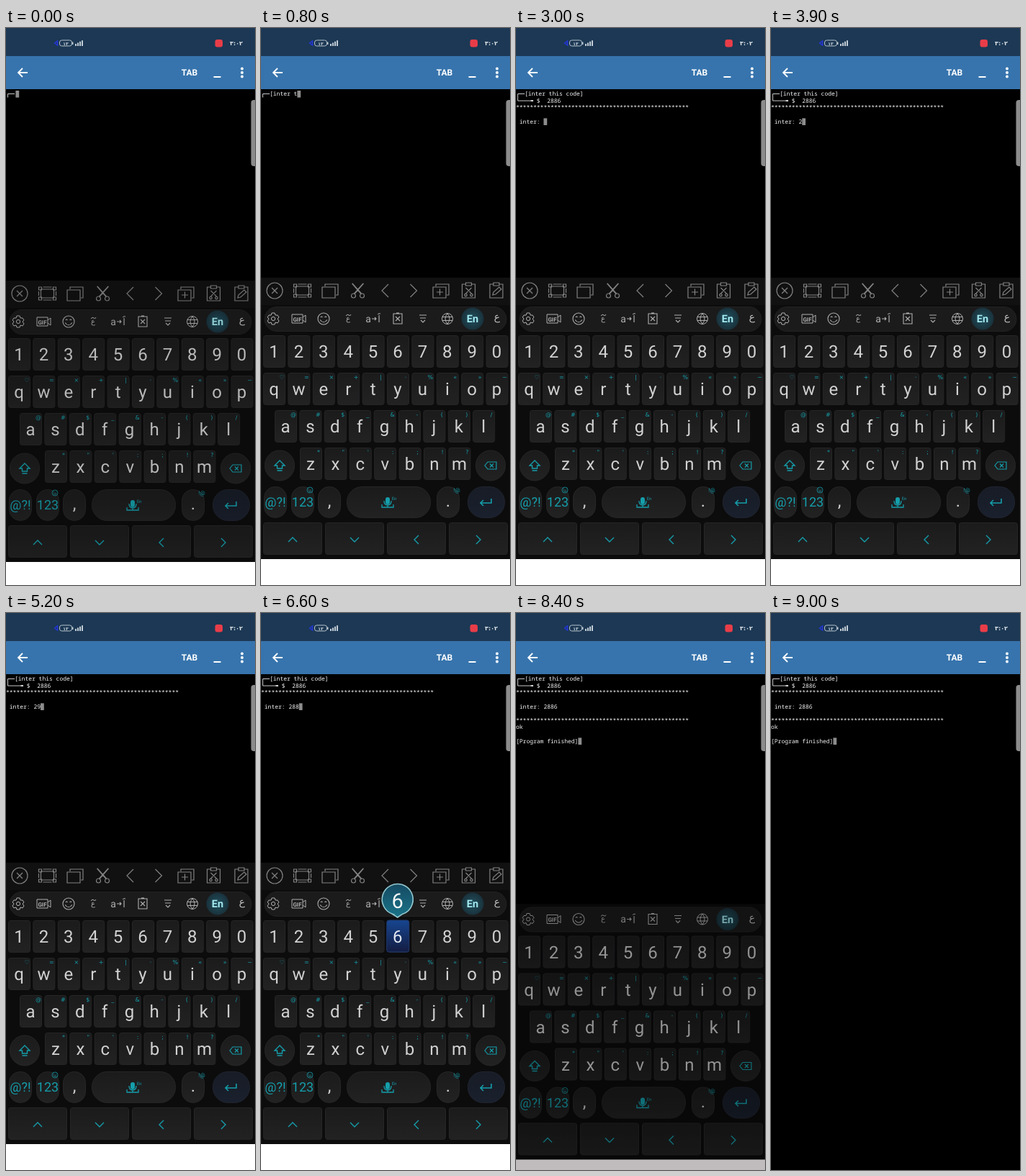
Animation, 346 px wide and 774 px high, one loop 10000 ms. Source, as an HTML page with a canvas:

```html
<!DOCTYPE html>
<html lang="en">
<head>
<meta charset="utf-8">
<title>Terminal typing</title>
<style>
html, body { margin: 0; width: 100%; height: 100%; overflow: hidden; background: #000; }
canvas { display: block; }
</style>
</head>
<body>
<canvas id="stage" width="346" height="774"></canvas>
<script>
const ctx = document.getElementById('stage').getContext('2d');
const LOOP = 10000, STEP = 100, CELL = 4.8, BOX = 6, LINE = 9.6;
const SANS = 'Roboto, sans-serif', SYMBOL = '"DejaVu Sans", sans-serif', MONO = '"Noto Sans Mono", monospace';
const TEAL = '#159eaa', GREY = '#818181', PALE = '#b0b0b0';
const STARS = '*'.repeat(50);
const INTRO = '[inter this code]\n└──╼ $  2886';

// [start, end, digit] of every key press
const PRESSES = [[3600, 3900, '2'], [4600, 5200, '9'], [5800, 6000, '8'], [6100, 6300, '8'], [6600, 7300, '6']];
// [time, typed answer]
const ANSWERS = [[0, ''], [3900, '2'], [5200, '29'], [5600, '2'], [6000, '28'], [6300, '288'], [7300, '2886']];

function rect(x, y, w, h, fill, radius = 0, stroke) {
  ctx.beginPath();
  ctx.roundRect(x, y, w, h, radius);
  ctx.fillStyle = fill;
  ctx.fill();
  if (stroke) {
    ctx.strokeStyle = stroke;
    ctx.lineWidth = 1;
    ctx.stroke();
  }
}

function text(s, x, y, size, color, family = SANS, align = 'center', weight = 400) {
  ctx.font = `${weight} ${size}px ${family}`;
  ctx.textAlign = align;
  ctx.fillStyle = color;
  ctx.fillText(s, x, y);
}

function icon(x, y, path, color, width = 1.2) {
  ctx.save();
  ctx.translate(x, y);
  ctx.strokeStyle = color;
  ctx.lineWidth = width;
  ctx.stroke(new Path2D(path));
  ctx.restore();
}

function shade(top, bottom, from, to) {
  const g = ctx.createLinearGradient(0, top, 0, bottom);
  g.addColorStop(0, from);
  g.addColorStop(1, to);
  return g;
}

function glow(x, y, r, inner, outer) {
  const g = ctx.createRadialGradient(x, y, 0, x, y, r);
  g.addColorStop(0, inner);
  g.addColorStop(1, outer);
  return g;
}

const circle = (x, y, r) => `M${x + r} ${y}a${r} ${r} 0 1 1 ${-2 * r} 0a${r} ${r} 0 1 1 ${2 * r} 0`;
const CLIPBOARD = 'M-4 -9H-9V10H9V-9H4M-4 -11H4V-7H-4Z';

const EDIT_ICONS = [
  circle(0, 0, 11) + 'M-4 -4L4 4M4 -4L-4 4',
  'M-9 -6H9V6H-9ZM-12 -9h4v4h-4zM8 -9h4v4h-4zM-12 5h4v4h-4zM8 5h4v4h-4zM-6 -9H6M-6 9H6M-12 -3V3M12 -3V3',
  'M-11 -5H7V10H-11ZM-7 -6V-9H11V6H8',
  'M-8 -10L5 5M8 -10L-5 5M-7.5 -10L5 4M7.5 -10L-5 4' + circle(-6, 7, 3) + circle(6, 7, 3),
  'M4 -9L-5 0L4 9',
  'M-4 -9L5 0L-4 9',
  'M-11 -5H7V10H-11ZM-7 -6V-9H11V6H8M-6 2H3M-1.5 -2.5V6.5',
  CLIPBOARD + 'M-4 -4L4 4M4 -4L-4 4' + circle(-4, 6, 1.7) + circle(4, 6, 1.7),
  CLIPBOARD + 'M-5 6L-4 2L4 -5L7 -2L-1 5Z'
];

const KEY_ROWS = [
  { keys: '1234567890', hints: '', x: 18, y: 427, baseline: 458 },
  { keys: 'qwertyuiop', hints: '♡=×+|·%«»~', x: 18, y: 479, baseline: 510 },
  { keys: 'asdfghjkl', hints: '@#$_&-()/', x: 34, y: 531, baseline: 562 },
  { keys: 'zxcvbnm', hints: '*"\':;!?', x: 69, y: 583, baseline: 614 }
];

function header() {
  rect(0, 0, 346, 39, '#1c3854');
  rect(0, 39, 346, 46, '#3774ad');

  icon(69.5, 21, 'M-2 0L2 -3V3Z', '#2337d8', 1.5);
  rect(74.5, 17, 17, 8, '#1c3854', 3, '#b4c0ca');
  rect(92, 19.5, 1.5, 3.5, '#b4c0ca');
  text('۱۳', 83, 23.5, 6, '#ccd6de', SYMBOL, 'center', 700);
  for (let i = 0; i < 4; i++) rect(96 + i * 3, 22 - i * 1.6, 2, 3 + i * 1.6, '#c2ccd5');
  rect(290.5, 16, 10.5, 10.5, '#e83d49', 3);
  text('۳:۰۲', 320, 24, 8, '#dfe5ea', SYMBOL, 'center', 700);

  icon(23, 62, 'M7 0H-5M0 -6L-6 0L0 6', '#fff', 1.8);
  text('TAB', 255, 66, 12, '#fff', SANS, 'center', 700);
  rect(288.5, 67, 10, 2, '#fff');
  for (const y of [56.5, 62, 67.5]) rect(326, y - 2, 4, 4, '#fff', 2);
}

function terminalLines(t) {
  const lines = ('┌─' + INTRO.slice(0, Math.floor(t / STEP))).split('\n');
  if (t >= 3000) {
    const answer = ANSWERS.filter(([time]) => t >= time).pop()[1];
    lines.push(STARS, '', ' inter: ' + answer);
  }
  if (t >= 7600) lines.push('', STARS, 'ok', '', '[Program finished]');
  return lines;
}

function terminal(t) {
  rect(0, 85, 346, 689, '#000');
  const lines = terminalLines(t);
  lines.forEach((line, row) => {
    const frame = line.match(/^[┌└─╼]*/)[0].length;
    const rest = line.slice(frame);
    const y = 91.5 + row * LINE;
    if (frame) {
      const end = Math.min(frame, 3) * BOX;
      icon(0, y, `M2.5 ${row ? -5 : 5}V0H${end}`, '#c8c8c8', 1);
      if (frame > 3) {
        icon(0, y, 'M18 0H21', '#c8c8c8', 1);
        icon(0, y, 'M20.5 0H24', '#d8d8d8', 2);
      }
    }
    text(rest, frame * BOX, 94.2 + row * LINE, 8, '#f4f4f4', MONO, 'left');
    if (row === lines.length - 1) {
      const x = frame && !rest ? (frame + 1) * CELL - 1 : frame * BOX + rest.length * CELL;
      rect(x, 87 + row * LINE, CELL, 9.6, '#8c8c8c');
    }
  });
  rect(340.5, 100, 12, 92, '#8c8c8c', 4);
}

function key(x, y, w, h, radius = 3) {
  rect(x, y, w, h, shade(y, y + h, '#1b1b1c', '#222223'), radius, '#262627');
}

function toolbar() {
  rect(5, 387.5, 336, 34, '#1b1b1c', 17, '#222223');
  icon(17, 404, circle(0, 0, 2.6) + 'M-2 -8H2L3 -5L6 -5L8 -2L6 0L8 3L6 6L3 5L2 8H-2L-3 5L-6 6L-8 3L-6 0L-8 -2L-6 -5L-3 -5Z', PALE, 1);
  icon(52, 404, 'M-9 -6H6V6H-9ZM6 -2L10 -5V5L6 2', PALE, 1);
  text('GIF', 50.5, 407.5, 8, PALE, SANS, 'center', 700);
  icon(87, 404, circle(0, 0, 8) + 'M-5 1.5Q0 8 5 1.5M-4 -2Q-3 -4 -1.5 -2M1.5 -2Q3 -4 4 -2', PALE, 1.1);
  text('ع', 121, 406.5, 10, PALE, SYMBOL);
  icon(121, 399, 'M-3 1Q-1 -2 1 0T4 -1', PALE, 1);
  text('a', 149, 408.5, 14, PALE);
  icon(157, 404, 'M-3 0H3M1 -2L3 0L1 2', PALE, 1.1);
  text('ا', 164, 409, 13, PALE, SYMBOL);
  icon(164, 397, 'M-2 1Q0 -1 2 0', PALE, 1);
  icon(190, 404, 'M-6 -7H6V7H-6ZM-2 -8H2M-3 -3L3 3M3 -3L-3 3', PALE, 1.1);
  icon(225, 404, 'M-5 -5H5M-4 -1H4M-3 2L0 5L3 2', PALE, 1.1);
  icon(259, 404, circle(0, 0, 7.5) + 'M-7 -2.5H7M-7 2.5H7M0 -7.5Q-6 0 0 7.5Q6 0 0 -7.5', PALE, 1);
  rect(278.5, 388.5, 31, 31, glow(294, 404, 15.5, '#21505e', '#19323c'), 15.5);
  text('En', 294, 409, 14.5, '#a4eaf1', SANS, 'center', 700);
  text('ع', 328, 406, 14, '#c0c0c0', SYMBOL);
}

function bottomRows(enterPressed) {
  key(5.5, 587, 41, 42, 21);
  icon(26, 608, 'M0 -7L7 0H3.5V4H-3.5V0H-7ZM-3.5 7H3.5', TEAL, 1.4);
  key(298.5, 587, 41, 42, 21);
  icon(319, 608, 'M-8 0L-4 -5H8V5H-4ZM-1 -2.5L4 2.5M4 -2.5L-1 2.5', TEAL, 1.2);

  for (const x of [20, 58, 95, 260]) key(x - 15.5, 637.5, 31, 43, 15);
  text('@?!', 20, 665, 18, TEAL);
  text('123', 58, 665, 18, TEAL);
  icon(68, 642, circle(0, 0, 4) + 'M-2 1Q0 3 2 1M-1.5 -1.5v1M1.5 -1.5v1', TEAL, 0.8);
  text(',', 95, 665, 24, '#d0d0d0');
  text('.', 260, 665, 24, '#d0d0d0');
  text('!@', 272, 645, 8, TEAL);

  key(119.5, 637.5, 116, 43, 21);
  rect(173, 652, 6, 10, TEAL, 3);
  icon(176, 657, 'M-5 0Q-5 6 0 6Q5 6 5 0M0 6V9M-8 5V9H8V5', TEAL, 1.3);
  text('En', 185, 656, 6, TEAL);

  rect(287.5, 637.5, 51, 43, enterPressed ? '#1c4890' : shade(637, 681, '#171c26', '#1a202d'), 21, '#20252f');
  icon(312, 659, 'M8 -5V1H-7M-3 -3L-7 1L-3 5', TEAL, 1.6);

  const arrows = ['M-6 3L0 -3L6 3', 'M-6 -3L0 3L6 -3', 'M3 -6L-3 0L3 6', 'M-3 -6L3 0L-3 6'];
  arrows.forEach((path, i) => {
    key(3.5 + i * 86, 687.5, 81, 44, 3);
    icon(44 + i * 86, 711, path, TEAL, 1.4);
  });
}

function popup(digit) {
  const x = 18 + KEY_ROWS[0].keys.indexOf(digit) * 34.35;
  rect(x - 15, 427, 31, 44, shade(427, 471, '#174590', '#141d42'), 3, '#1f3a70');
  text(digit, x, 458, 24, '#e1e6ee');
  ctx.beginPath();
  ctx.moveTo(x - 7, 418.5);
  ctx.arc(x, 398, 21.5, Math.PI * 0.6, Math.PI * 2.4);
  ctx.lineTo(x, 423);
  ctx.closePath();
  ctx.fillStyle = shade(376, 422, '#154a62', '#1a7388');
  ctx.fill();
  ctx.strokeStyle = '#94c8cf';
  ctx.lineWidth = 1.6;
  ctx.stroke();
  text(digit, x, 410, 29, '#f2f7f8');
}

function keyboard(t) {
  const closing = t >= 8400;
  const shift = closing ? 21.5 : t < 100 ? 4 : 0;
  const top = closing ? 383 : 347;
  ctx.save();
  ctx.translate(0, shift);
  rect(0, top, 346, 392, '#0c0c0d');
  if (!closing) {
    rect(0, 347, 346, 38, '#111112');
    EDIT_ICONS.forEach((path, i) => icon(19 + i * 38.5, 365, path, GREY));
  }
  toolbar();
  for (const { keys, hints, x, y, baseline } of KEY_ROWS) {
    [...keys].forEach((letter, i) => {
      const center = x + i * 34.4;
      key(center - 14.5, y + 0.5, 30, 44);
      text(letter, center, baseline, 24, '#d2d2d2');
      if (hints) text([...hints][i], center + 11, y + 9, 8, TEAL, SYMBOL);
    });
  }
  bottomRows(t >= 7400 && t < 7700);
  const press = PRESSES.find(([start, end]) => t >= start && t < end);
  if (press) popup(press[2]);
  if (shift) rect(0, top, 346, 392, closing ? 'rgba(0,0,0,.3)' : 'rgba(0,0,0,.12)');
  rect(0, 738, 346, 40, closing ? '#c0bcbe' : '#fff');
  ctx.restore();
}

function draw(now) {
  const t = now % LOOP;
  ctx.textRendering = 'geometricPrecision';
  terminal(t);
  header();
  if (t < 8500) keyboard(t);
}

const begin = performance.now();
function tick() {
  draw(performance.now() - begin);
  requestAnimationFrame(tick);
}
tick();
</script>
</body>
</html>
```
